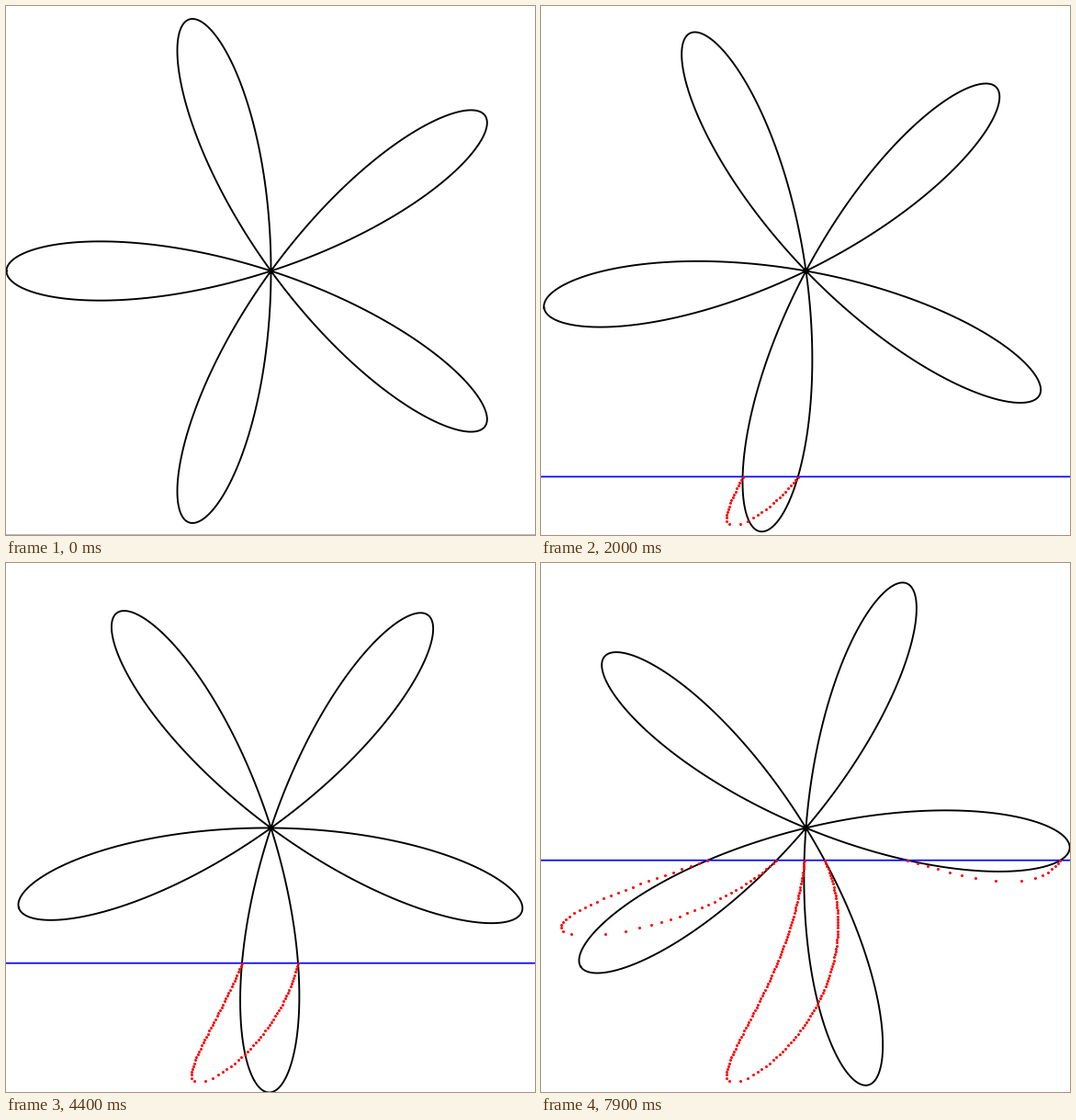
Write a matplotlib script that moves like this. It is 576 px wide and 576 px high and loops after 8 s.

```python
import numpy as np
import matplotlib.pyplot as plt
from matplotlib.animation import FuncAnimation

SIZE = 576
FRAMES = 80
STEPS = 180                  # steps for a full sweep of the stage
CENTER = SIZE / 2 + 0.5
RADIUS = SIZE / 2
THETA = np.linspace(0, np.pi, 3001)


def rose(k):
    """Five-petal rose, turned by k steps."""
    r = RADIUS * np.cos(5 * THETA)
    angle = THETA + np.pi - np.radians(72 * k / STEPS)
    return CENTER + r * np.cos(angle), CENTER + r * np.sin(angle)


def level(k):
    return SIZE + 0.5 - SIZE * k / STEPS


def crossings(k):
    """Points where the sweeping line meets the rose."""
    x, y = rose(k)
    d = y - level(k)
    i = np.flatnonzero(d[:-1] * d[1:] < 0)
    t = d[i] / (d[i] - d[i + 1])
    xs = x[i] + t * (x[i + 1] - x[i])
    return np.column_stack([xs, np.full(len(i), level(k))])


hits = [crossings(k) for k in range(FRAMES)]

plt.rcParams["path.simplify"] = False
fig = plt.figure(figsize=(8, 8), dpi=72, facecolor="white")
ax = fig.add_axes([0, 0, 1, 1])
ax.set_xlim(0, SIZE)
ax.set_ylim(SIZE, 0)
ax.axis("off")

curve, = ax.plot([], [], color="black", lw=1.9, snap=False)
sweep, = ax.plot([], [], color="blue", lw=1.7, snap=False)
dots, = ax.plot([], [], "o", color="red", ms=3, mew=0, snap=False)


def update(k):
    curve.set_data(*rose(k))
    sweep.set_data([-5, SIZE + 5], [level(k)] * 2)
    sweep.set_color("blue" if k else "#404040")
    dots.set_data(*np.vstack(hits[:k + 1]).T)
    return curve, sweep, dots


anim = FuncAnimation(fig, update, frames=FRAMES, interval=100,
                     repeat=True, repeat_delay=0, blit=False)
plt.show()
```
